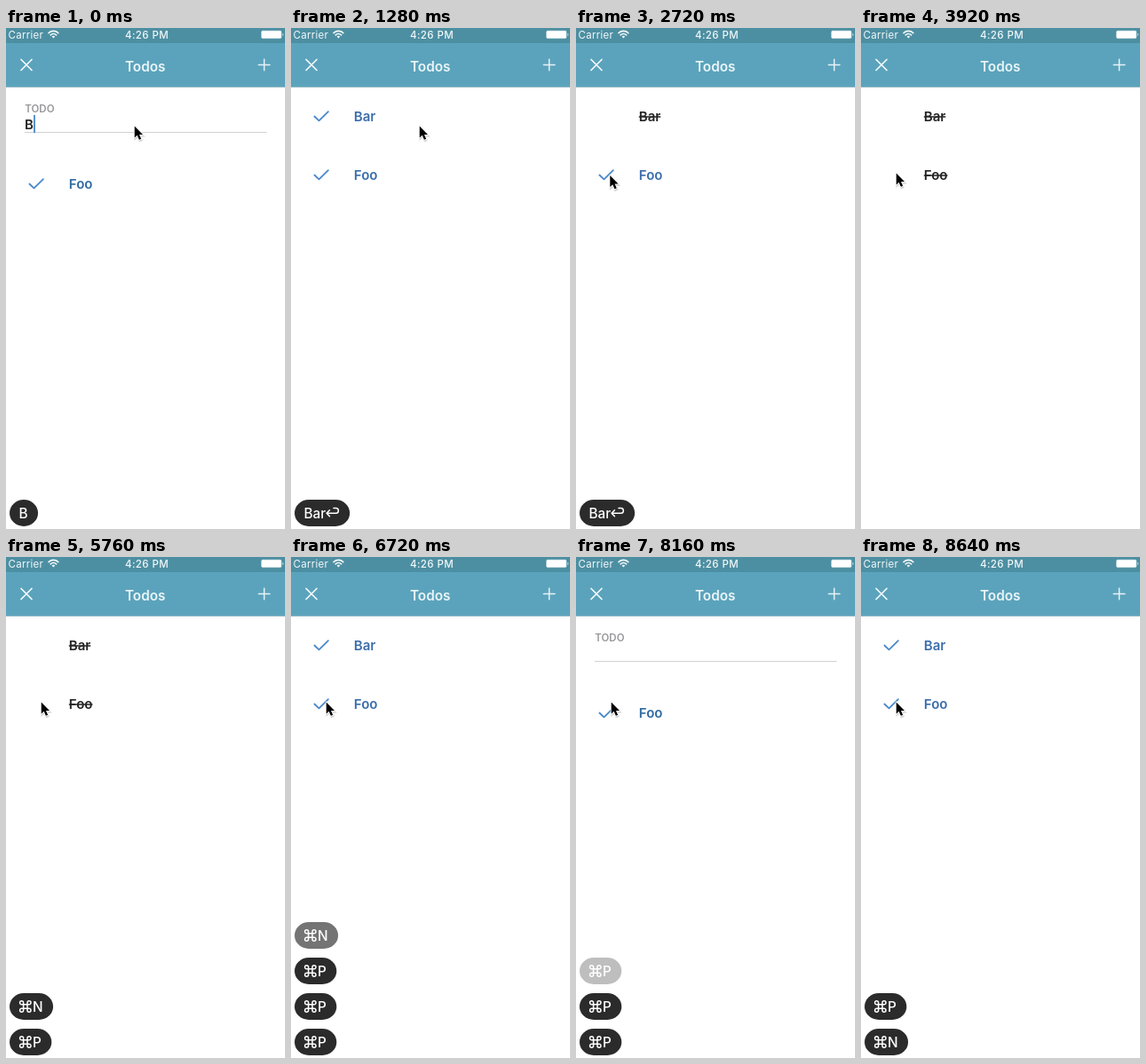
An HTML page that plays this animation: 314x564 px, repeating every 8.72 s.

```html
<!DOCTYPE html>
<html lang="en">
<head>
<meta charset="utf-8">
<title>Todos</title>
<style>
  html, body { margin: 0; width: 100%; height: 100%; overflow: hidden; background: #fff; }
  svg { display: block; }
  text { font-family: Inter, Roboto, "Liberation Sans", sans-serif; white-space: pre; }
  .status { font-size: 11.5px; fill: #f2f8fa; }
  .title { font-size: 15.3px; font-weight: 600; fill: #eaf5f8; }
  .label { font-size: 11.5px; font-weight: 600; fill: #98989b; }
  .item { font-size: 15px; font-weight: 600; }
  .done { fill: #242424; text-decoration: line-through; }
  .key { font-size: 15.3px; font-weight: 500; fill: #fff; }
  .line { fill: none; stroke-linecap: round; stroke-linejoin: round; }
</style>
</head>
<body>
<svg width="314" height="564" viewBox="0 0 314 564">
  <rect width="314" height="564" fill="#fff"/>
  <rect width="314" height="66" fill="#5ba3bc"/>
  <rect width="314" height="17" fill="#4d8fa2"/>
  <rect y="66" width="314" height="1" fill="#94bac6"/>

  <text class="status" x="2.5" y="11.5" letter-spacing=".3">Carrier</text>
  <path class="line" d="M48 5.6a7.6 7.6 0 0 1 10.8 0M50.2 7.9a4.5 4.5 0 0 1 6.4 0"
        stroke="#f2f8fa" stroke-width="1.6"/>
  <path d="M53.4 11.6l-1.8-1.9a2.6 2.6 0 0 1 3.6 0z" fill="#f2f8fa"/>
  <text class="status" x="134" y="11.5" font-weight="500" letter-spacing=".4">4:26 PM</text>
  <rect x="287.6" y="3.2" width="22.2" height="8.4" rx="1.3" fill="#fff"
        stroke="#fff" stroke-opacity=".45"/>
  <path d="M311.3 5.7a2 2 0 0 1 0 3.4z" fill="#fff" opacity=".8"/>

  <path class="line" d="M17 35.5l12 12M29 35.5l-12 12" stroke="#f4fafb" stroke-width="1.7"/>
  <text class="title" x="156.7" y="48.6" text-anchor="middle">Todos</text>
  <path class="line" d="M284.3 41.5h12.6M290.6 35.2v12.6" stroke="#e6f2f6" stroke-width="1.5"/>

  <g id="page"></g>
  <g id="keys"></g>
  <g id="pointer">
    <path d="M0 0V14L3.2 11.1L5.6 16.4L8 15.3L5.7 10.2H10Z" transform="translate(.6 1.6) scale(.93)"
          fill="#000" stroke="#000" stroke-width="2" opacity=".16"/>
    <path d="M0 0V14L3.2 11.1L5.6 16.4L8 15.3L5.7 10.2H10Z" transform="scale(.93)" fill="#000"
          stroke="#fff" stroke-width="1.8" stroke-linejoin="round" paint-order="stroke"/>
  </g>
</svg>

<script>
const LOOP = 8720, STEP = 80;
const BLUE = '#4a88ca';

// Screens: a string is the text in the input, an array says which todos are done.
const screens = [
  [0, 'B'], [320, 'Ba'], [400, 'Bar'],
  [880, [false, false]], [2320, [true, false]], [3120, [true, true]],
  [6160, [true, false]], [6560, [false, false]],
  [7360, ''], [8400, [false, false]]
];

// Pressed keys: start, label, and the time the label is replaced, if it is.
const presses = [
  [0, 'B', 320], [320, 'Ba', 400], [400, 'Bar', 880], [880, 'Bar↩'],
  [4800, '⌘N'], [5760, '⌘P'], [6160, '⌘P'], [6560, '⌘P'], [7360, '⌘P'], [8400, '⌘N']
];

// Pointer tip: time, x, y.
const path = [
  [1680, 144.7, 110.4], [1760, 141, 112], [1920, 95, 117], [2080, 48, 104],
  [2240, 36, 98], [2400, 35, 98], [2480, 35.5, 104], [2560, 37, 118],
  [2640, 38, 143], [2720, 38.3, 166], [2960, 35, 166.3], [3280, 34, 165.5],
  [3360, 34, 165.5], [3440, 35, 164.5], [3520, 37, 164], [3760, 37, 164],
  [3840, 38.5, 163.5], [3920, 39.7, 163.4]
];

const $ = id => document.getElementById(id);
const ruler = document.createElement('canvas').getContext('2d');

function widthOf(text, font) {
  ruler.font = font + ' Inter, Roboto, "Liberation Sans", sans-serif';
  return ruler.measureText(text).width;
}

function todo(name, y, done, color) {
  const text = `<text class="item${done ? ' done' : ''}" x="70.8" y="${y + 6}" fill="${color}">${name}</text>`;
  const check = `<path class="line" d="M26.4 ${y + .5}l5.1 4.8L41.9 ${y - 4.8}" stroke="${BLUE}" stroke-width="1.8"/>`;
  return done ? text : text + check;
}

function list([bar, foo]) {
  const color = '#3b6dab';
  return todo('Bar', 99, bar, color) + todo('Foo', 165, foo, color);
}

function form(text, caret) {
  const x = 21.2 + widthOf(text, '600 15px');
  return `<text class="label" x="21.3" y="94.8">TODO</text>
    <rect x="21" y="117" width="272.5" height="1" fill="#d2d2d4"/>
    <text class="item" x="21" y="113.6" fill="#242424">${text}</text>
    ${caret ? `<rect x="${x}" y="98" width="1.8" height="20" fill="${BLUE}"/>` : ''}
    ${todo('Foo', 175, false, '#2f6ba2')}`;
}

const icons = {
  '⌘': 'M5.1 -4.2A2 2 0 1 0 3.1 -2.2H11.5A2 2 0 1 0 9.5 -4.2V4.2A2 2 0 1 0 11.5 2.2H3.1A2 2 0 1 0 5.1 4.2Z',
  '↩': 'M4.3 -3.2L.9 .2L4.3 3.6M.9 .2H11.4A2.8 2.8 0 0 0 11.4 -5.4H8.8'
};

function pill(label, slot, opacity) {
  let x = 10.5, parts = '';
  for (const bit of label.match(/[⌘↩]|[^⌘↩]+/g)) {
    if (icons[bit]) {
      parts += `<path class="line" d="${icons[bit]}" transform="translate(${x} 15)" stroke="#fff" stroke-width="1.5"/>`;
      x += 15.5;
    } else {
      parts += `<text class="key" x="${x}" y="20.7">${bit}</text>`;
      x += widthOf(bit, '500 15.3px');
    }
  }
  return `<g transform="translate(4 ${531 - 40 * slot})" opacity="${opacity}">
    <rect width="${x + 11.5}" height="30" rx="16" ry="15" fill="#2b2b2b"/>${parts}</g>`;
}

function fade(age) {
  return age < 1920 ? 1 : age < 2000 ? .65 : age < 2080 ? .3 : 0;
}

function stack(t) {
  return presses
    .filter(([at, , end = LOOP]) => at <= t && t < end && fade(t - at) > 0)
    .reverse()
    .map(([at, label], slot) => pill(label, slot, fade(t - at)))
    .join('');
}

function tip(t) {
  const next = path.findIndex(p => p[0] > t);
  if (next === 0) return path[0].slice(1);
  if (next < 0) return path[path.length - 1].slice(1);
  const a = path[next - 1], b = path[next];
  const k = (t - a[0]) / (b[0] - a[0]);
  return [1, 2].map(i => a[i] + (b[i] - a[i]) * k);
}

function draw(t) {
  const screen = screens.filter(s => s[0] <= t).pop()[1];
  $('page').innerHTML = Array.isArray(screen) ? list(screen) : form(screen, t < 8000);
  $('keys').innerHTML = stack(t);
  $('pointer').setAttribute('transform', `translate(${tip(t)})`);
}

const start = performance.now();
let shown = -1;
function tick() {
  const t = Math.floor((performance.now() - start) % LOOP / STEP) * STEP;
  if (t !== shown) draw(shown = t);
  requestAnimationFrame(tick);
}
tick();
</script>
</body>
</html>
```
